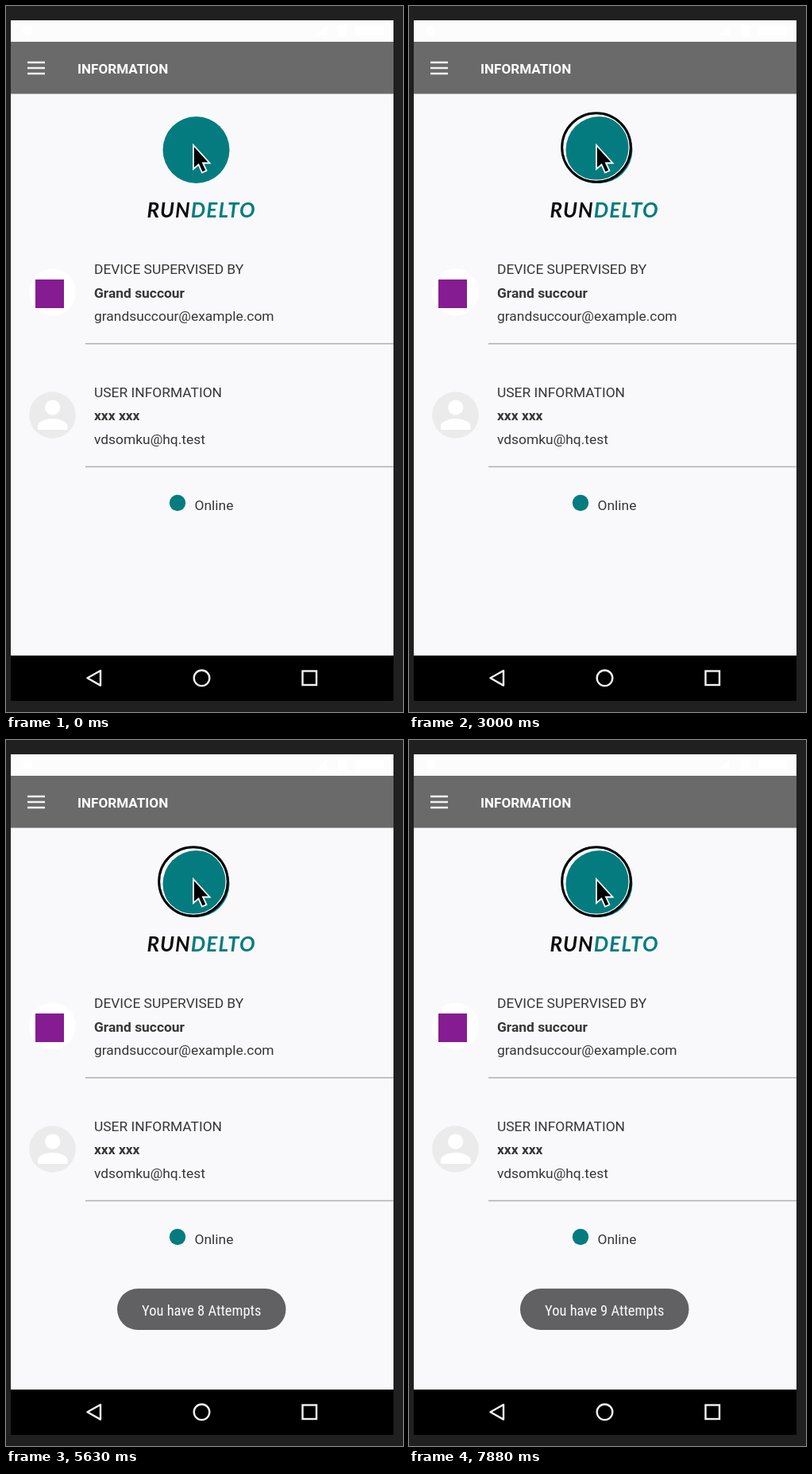
Write an HTML page that moves like this. It is 500 px wide and 888 px high and loops after 8 s.

```html
<!DOCTYPE html>
<html lang="en">
<head>
<meta charset="utf-8">
<title>Device information</title>
<style>
html, body { margin: 0; width: 100%; height: 100%; overflow: hidden; background: #202020; }
svg { display: block; width: 100vw; height: 100vh; }
text { font: 17.4px Roboto, Arial, sans-serif; fill: #363636; }
.bold { font-weight: 700; }
.title { font-size: 17.1px; fill: #fff; }
.brand { font: italic 700 26px Lato, sans-serif; letter-spacing: 1.1px; fill: #0c0c0c; }
.brand .tail { fill: #047c7f; }
.toast text { font: 18.5px "Roboto Condensed", Roboto, sans-serif; font-stretch: 75%; fill: #fafafa; text-anchor: middle; }
.icon { fill: none; stroke: #f2f2f2; stroke-width: 2.4; }

/* eighteen even taps in each loop */
.ring { animation: tap calc(8s / 18) step-end infinite; }
.n7, .n8, .n9 { opacity: 0; animation: 8s step-end infinite; }
.n7 { animation-name: seven; }
.n8 { animation-name: eight; }
.n9 { animation-name: nine; }
.toast { animation: appear 8s linear infinite; }

@keyframes tap {
  0%, 97%, 100% { opacity: 0; }
  62% { opacity: 1; }
}
@keyframes appear {
  0%, 39% { opacity: 0; }
  42%, 100% { opacity: 1; }
}
@keyframes seven {
  0%, 68.7%, 100% { opacity: 0; }
  39% { opacity: 1; }
}
@keyframes eight {
  0%, 98.4%, 100% { opacity: 0; }
  68.7% { opacity: 1; }
}
@keyframes nine {
  0% { opacity: 0; }
  98.4%, 100% { opacity: 1; }
}
</style>
</head>
<body>
<svg viewBox="0 0 500 888">
  <rect width="500" height="888" fill="#202020"/>
  <rect x="6" y="18" width="482" height="800" fill="#f9f9fb"/>

  <!-- status bar -->
  <rect x="6" y="18" width="482" height="27" fill="#fcfcfc"/>
  <g fill="#fff">
    <circle cx="27" cy="31" r="6"/>
    <path d="M390 37L404 24V37ZM418 24H429V38H418ZM440 25H476V37H440Z"/>
  </g>

  <!-- app bar -->
  <rect x="6" y="45" width="482" height="65.5" fill="#6a6a6a"/>
  <path class="icon" d="M27 71H49M27 78H49M27 85H49"/>
  <text class="bold title" x="90" y="85">INFORMATION</text>

  <!-- brand -->
  <circle cx="239.5" cy="181" r="42" fill="#047c7f"/>
  <text class="brand" x="177.5" y="266">RUN<tspan class="tail">DELTO</tspan></text>

  <!-- supervisor -->
  <circle cx="58.5" cy="360" r="29.5" fill="#fff"/>
  <rect x="37" y="344" width="36" height="36" fill="#861c92"/>
  <text x="111" y="337">DEVICE SUPERVISED BY</text>
  <text class="bold" x="111" y="366.5">Grand succour</text>
  <text x="111" y="395.5">grandsuccour@example.com</text>
  <path d="M100 424.7H488" stroke="#b0b0b4" stroke-width="1.6"/>

  <!-- user -->
  <circle cx="58.5" cy="514.5" r="29.3" fill="#ebebeb"/>
  <g fill="#fff">
    <circle cx="58.7" cy="505" r="9.6"/>
    <path d="M40 533V528.5C40 522 52 519 58.7 519S77.5 522 77.5 528.5V533Z"/>
  </g>
  <text x="111" y="491.5">USER INFORMATION</text>
  <text class="bold" x="111" y="521">xxx xxx</text>
  <text x="111" y="550.5">vdsomku@hq.test</text>
  <path d="M100 579.5H488" stroke="#b0b0b4" stroke-width="1.6"/>

  <circle cx="216" cy="625" r="10.2" fill="#047c7f"/>
  <text x="237.5" y="634">Online</text>

  <g class="toast">
    <rect x="140" y="690" width="212.5" height="52" rx="26" fill="#616163"/>
    <text class="n7" x="246.3" y="723.5">You have 7 Attempts</text>
    <text class="n8" x="246.3" y="723.5">You have 8 Attempts</text>
    <text class="n9" x="246.3" y="723.5">You have 9 Attempts</text>
  </g>

  <!-- navigation bar -->
  <rect x="6" y="817" width="482" height="57" fill="#000"/>
  <g class="icon">
    <path d="M102.5 845.3L119 836V854.6Z" stroke-linejoin="round"/>
    <circle cx="246.5" cy="845.3" r="9.8"/>
    <rect x="373.5" y="836.5" width="17.5" height="17.5"/>
  </g>

  <g class="ring" fill="none">
    <circle cx="236" cy="178" r="41.3" stroke="#fff" stroke-width="1.6"/>
    <circle cx="236" cy="178" r="43.3" stroke="#000" stroke-width="3"/>
  </g>
  <path d="M236 175V205L242.5 199.5L247 209.5L252.5 207L248 197.5H256.5Z"
    fill="#000" stroke="#fff" stroke-width="1.8"/>
</svg>
</body>
</html>
```
